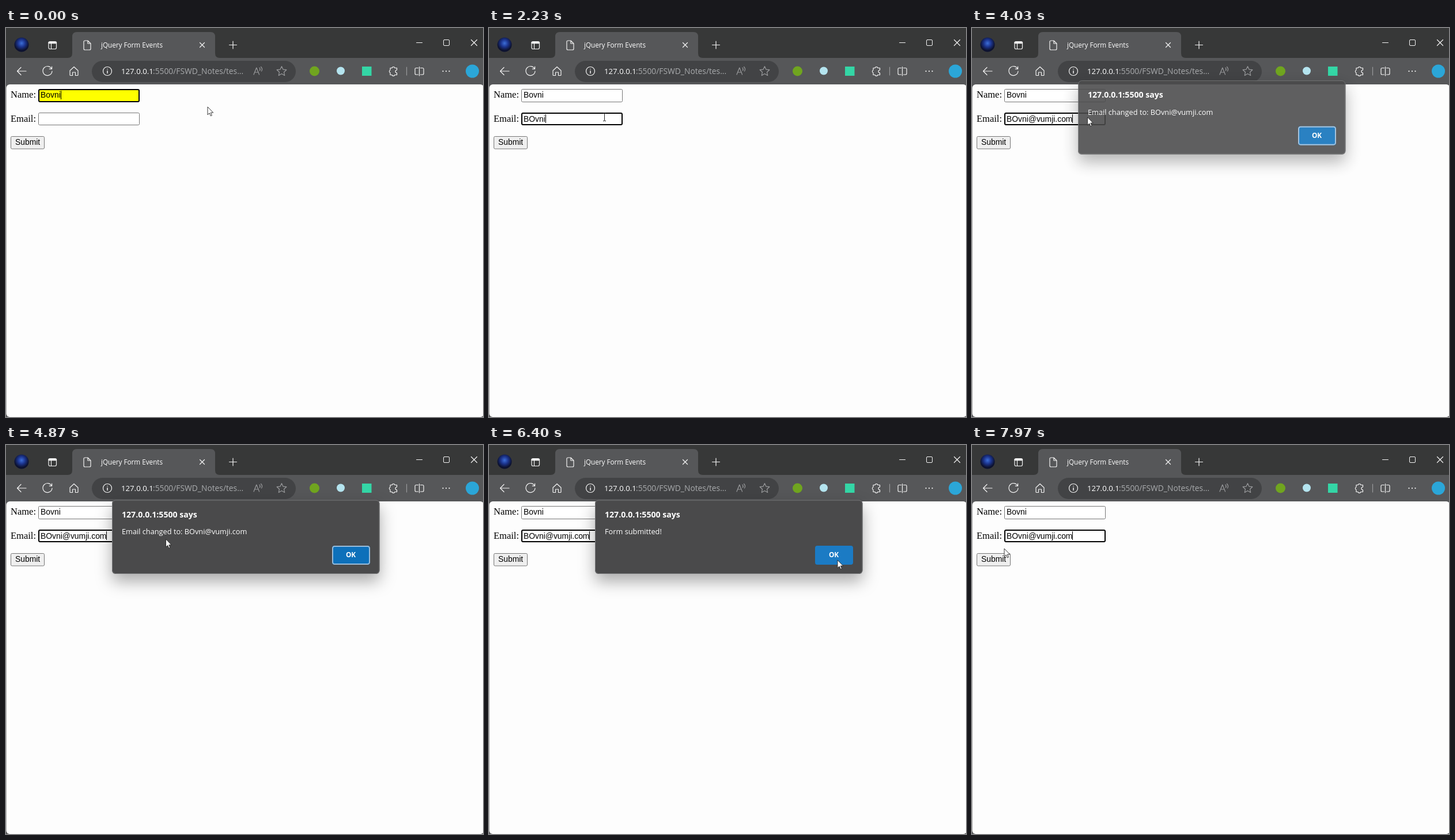
Animation of 828x676 px, one loop 8000 ms. Source, as an HTML page:

```html
<!DOCTYPE html>
<html lang="en">
<head>
<meta charset="utf-8">
<title>jQuery Form Events</title>
<style>
  html, body { margin: 0; width: 100%; height: 100%; overflow: hidden; background: #565759; }
  svg { display: block; width: 828px; height: 676px; }
  text { white-space: pre; }
  .ui { font-family: "Open Sans", "Noto Sans", sans-serif; fill: #fff; }
  .label { font: 16.5px "Liberation Serif", "Times New Roman", serif; }
  .control { font: 13.9px "Liberation Sans", Arial, sans-serif; }
  .icon { fill: none; stroke: #f4f4f4; stroke-width: 1.2; stroke-linecap: round; stroke-linejoin: round; }
  .dim { stroke: #9a9b9d; }
  .shadow { filter: drop-shadow(0 13px 14px rgba(0, 0, 0, .33)); }
</style>
</head>
<body>
<svg viewBox="0 0 828 676">
  <defs>
    <radialGradient id="avatar" cy=".4">
      <stop offset="0" stop-color="#3d6fd8"/>
      <stop offset=".5" stop-color="#1c3590"/>
      <stop offset="1" stop-color="#0d1230"/>
    </radialGradient>
  </defs>

  <!-- Window frame and tab strip -->
  <rect width="828" height="676" fill="#565759"/>
  <path d="M0 0H828V52H371Q363 52 363 44V15Q363 7 355 7H123Q115 7 115 15V44Q115 52 107 52H0Z" fill="#373838"/>
  <circle cx="27" cy="29" r="12.5" fill="url(#avatar)"/>
  <g class="icon">
    <rect x="74" y="23.5" width="13.5" height="13" rx="2.5"/>
    <path d="M75 25.5H86.5" stroke-width="3.4"/>
    <path d="M78.5 27V36"/>
    <path d="M137 22H142L147 27V36Q147 38 145 38H137Q135 38 135 36V24Q135 22 137 22ZM142 22V27H147"/>
    <path d="M336.5 25.5L344.5 33.5M344.5 25.5L336.5 33.5"/>
    <path d="M387.5 29.5H400.5M394 23V36"/>
    <path d="M712.5 25.5H722.5" stroke-width="1"/>
    <rect x="759.5" y="20.5" width="10" height="10" rx="1.5" stroke-width="1"/>
    <path d="M807.5 20.5L817.5 30.5M817.5 20.5L807.5 30.5"/>
  </g>
  <text class="ui" x="165" y="34" font-size="11.7">jQuery Form Events</text>

  <!-- Toolbar -->
  <rect x="149" y="57" width="354" height="37" rx="18.5" fill="#424345"/>
  <g class="icon">
    <path d="M35 75H19.5M26 68.5L19.5 75L26 81.5"/>
    <path d="M79.2 71A8 8 0 1 0 80 75M79.6 67V71.2H75.4"/>
    <path d="M111 74L118 67.5L125 74V81.5Q125 82.5 124 82.5H120.5V77H115.5V82.5H112Q111 82.5 111 81.5Z"/>
    <circle cx="176" cy="75" r="7.5"/>
    <path d="M176 74.5V78.5M176 71.5V71.6" stroke-width="1.5"/>
    <path class="dim" d="M430 81L434.8 69L439.6 81M431.7 77H438M440 69Q442 71.5 440.5 74M442.5 67.5Q446 71 443.5 75"/>
    <path class="dim" d="M478.5 66.7L481 72.1L486.8 72.7L482.5 76.7L483.7 82.5L478.5 79.6L473.3 82.5L474.5 76.7L470.2 72.7L476 72.1Z"/>
    <path d="M667 69.5H670A2.6 2.6 0 0 1 675 69.5H678.5V73A2.5 2.5 0 0 0 678.5 78V81.5H674.8A2.5 2.5 0 0 1 670 81.5H667V77.8A2.6 2.6 0 0 1 667 73Z"/>
    <path class="dim" d="M695.5 68V82"/>
    <path d="M715.5 69.5H712Q710 69.5 710 71.5V79Q710 81 712 81H715.5M719.5 69.5H723Q725 69.5 725 71.5V79Q725 81 723 81H719.5M717.5 67.5V83"/>
    <path d="M758.5 75V75.1M764 75V75.1M769.5 75V75.1" stroke-width="2.2"/>
  </g>
  <text class="ui" x="200" y="80" font-size="13.2">127.0.0.1</text>
  <text class="ui" x="255" y="80" font-size="13.8" style="fill:#a9abad">:5500/FSWD_Notes/tes...</text>
  <circle cx="535.5" cy="75" r="8.5" fill="#70a51f"/>
  <circle cx="581" cy="74.5" r="7" fill="#b4e4ef"/>
  <rect x="618" y="67" width="16.5" height="16" fill="#34d6a6"/>
  <circle cx="809.5" cy="75" r="11.5" fill="#2ba6d8"/>

  <!-- Page -->
  <rect x=".5" y="98" width="829" height="578" rx="6" fill="#fdfdfd"/>
  <text class="label" x="8" y="121">Name:</text>
  <text class="label" x="8" y="162.5">Email:</text>
  <rect id="nameBox" rx="2"/>
  <text id="nameText" class="control" x="60" y="121.3">Bovni</text>
  <rect id="emailBox" rx="2"/>
  <text id="emailText" class="control" x="60" y="162.6"></text>
  <path id="caret" d="M.5 0V15" stroke="#000"/>
  <rect x="8.5" y="188.5" width="58" height="21.5" rx="2" fill="#efefef" stroke="#767676"/>
  <text class="control" x="16" y="203">Submit</text>

  <!-- Alert -->
  <g id="dialog">
    <rect class="shadow" x="184" y="95.5" width="464.5" height="128.5" rx="6" fill="#4a4a4b"/>
    <rect x="184.5" y="96" width="463.5" height="127.5" rx="6" fill="none" stroke="#77787a"/>
    <text class="ui" x="201" y="125.5" font-size="14.1" font-weight="700">127.0.0.1:5500 says</text>
    <text id="message" class="ui" x="201" y="155" font-size="12.75"></text>
    <rect id="okButton" x="566" y="175" width="66" height="33" rx="4"/>
    <rect id="okRing" x="567" y="176" width="64" height="31" rx="3.5" fill="none" stroke="#9abcd9" stroke-width="2"/>
    <text class="ui" x="598.5" y="195.3" font-size="11.8" font-weight="700" text-anchor="middle">OK</text>
  </g>

  <path id="arrow" d="M0 0V13.8L3.2 10.9L5.3 15.8L7.4 14.9L5.4 10.1H9.7Z" fill="#fff" stroke="#222" stroke-width=".9"/>
  <path id="beam" d="M-2.5 -7H-.5L0 -6.5L.5 -7H2.5M0 -6.5V6M-2.5 6.5H-.5L0 6L.5 6.5H2.5" fill="none" stroke="#222"/>
</svg>
<script>
  const LOOP = 8000, FADE = 100, BLINK = 530;
  const EMAIL = "BOvni@vumji.com";
  const FOCUS_EMAIL = 1050, TYPE_START = 1550, KEY_GAP = 160;
  const ALERTS = [
    { open: 3960, close: 6120, text: "Email changed to: " + EMAIL, ring: true },
    { open: 6290, close: 7600, text: "Form submitted!", ring: false }
  ];
  // Pointer stops: time, x, y
  const POINTER = [
    [250, 350, 137], [950, 200.5, 155], [4550, 200.5, 155], [5700, 605, 200],
    [6550, 605, 200], [6930, 394, 185], [7450, 56, 180]
  ];

  const $ = id => document.getElementById(id);
  const set = (id, attrs) => {
    for (const key in attrs) $(id).setAttribute(key, attrs[key]);
  };
  const show = (id, visible) => set(id, { visibility: visible ? "visible" : "hidden" });
  const clamp = v => Math.min(1, Math.max(0, v));

  function pointerAt(t) {
    const next = POINTER.findIndex(stop => stop[0] > t);
    if (next < 0) return POINTER[POINTER.length - 1].slice(1);
    if (next === 0) return POINTER[0].slice(1);
    const [t0, x0, y0] = POINTER[next - 1], [t1, x1, y1] = POINTER[next];
    const p = (t - t0) / (t1 - t0), eased = p * p * (3 - 2 * p);
    return [x0 + (x1 - x0) * eased, y0 + (y1 - y0) * eased];
  }

  // The border lies fully inside the field, so its outer edge stays put on focus.
  function drawField(id, top, height, focused, fill) {
    const border = focused ? 2 : 1;
    set(id, {
      x: 56 + border / 2, y: top + border / 2, width: 176 - border, height: height - border,
      fill, stroke: focused ? "#000" : "#767676", "stroke-width": border
    });
  }

  function drawForm(t) {
    const onEmail = t >= FOCUS_EMAIL;
    const typed = Math.min(EMAIL.length, Math.max(0, Math.floor((t - TYPE_START) / KEY_GAP) + 1));
    drawField("nameBox", 106, 23, !onEmail, onEmail ? "#fff" : "#ffff00");
    drawField("emailBox", 147, 22, onEmail, "#fff");
    $("emailText").textContent = EMAIL.slice(0, typed);

    const width = $(onEmail ? "emailText" : "nameText").getComputedTextLength();
    set("caret", { transform: `translate(${Math.round(60 + width)} ${onEmail ? 150 : 109})` });
    show("caret", onEmail || t % (2 * BLINK) < BLINK);
  }

  function drawAlert(t, x, y) {
    const alert = ALERTS.find(a => t >= a.open && t < a.close + FADE);
    show("dialog", alert);
    show("okRing", alert && alert.ring);
    if (!alert) return false;
    const p = Math.min(clamp((t - alert.open) / FADE), clamp((alert.close + FADE - t) / FADE));
    const hover = x > 566 && x < 632 && y > 175 && y < 208;
    set("dialog", { opacity: 1 - (1 - p) ** 1.7, transform: `translate(0 ${-15 * (1 - p)})` });
    set("okButton", { fill: hover ? "#1b7bc4" : "#0d70ba" });
    $("message").textContent = alert.text;
    return true;
  }

  function draw(now) {
    const t = now % LOOP;
    const [x, y] = pointerAt(t);
    drawForm(t);
    const modal = drawAlert(t, x, y);
    const overField = !modal && x > 56 && x < 232 && y > 147 && y < 169;
    show("arrow", !overField);
    show("beam", overField);
    set(overField ? "beam" : "arrow", { transform: `translate(${x} ${y})` });
    requestAnimationFrame(draw);
  }
  requestAnimationFrame(draw);
</script>
</body>
</html>
```
